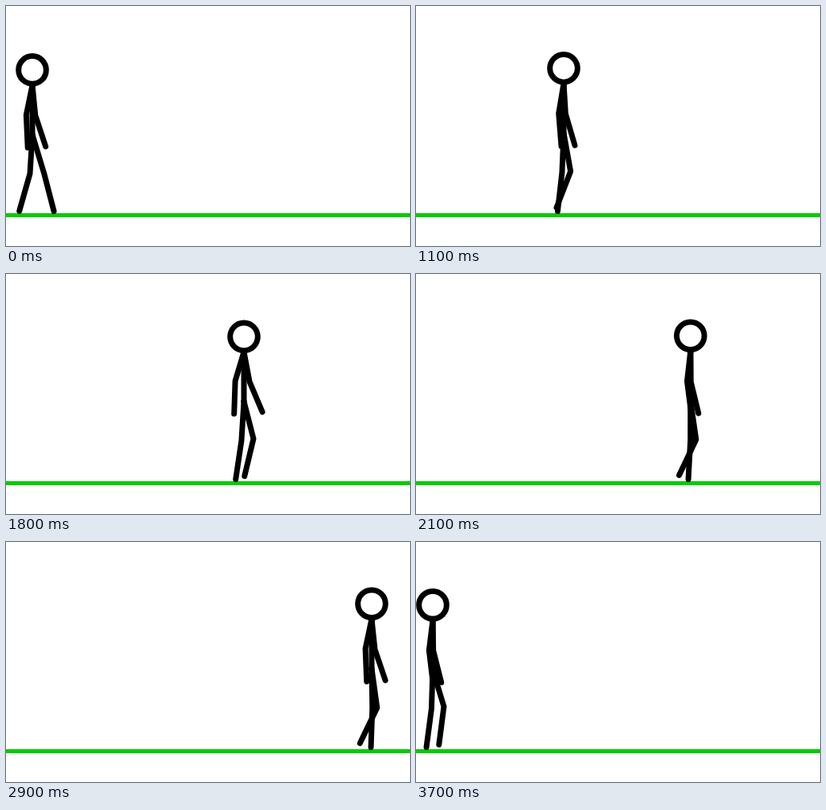
Write an HTML page with a canvas that moves like this. It is 506 px wide and 300 px high and loops after 3800 ms.

```html
<!DOCTYPE html>
<html lang="en">
<head>
<meta charset="utf-8">
<title>Walking figure</title>
<style>
  html, body { margin: 0; width: 100%; height: 100%; overflow: hidden; background: #fff; }
  canvas { display: block; }
</style>
</head>
<body>
<canvas id="stage" width="506" height="300"></canvas>
<script>
const ctx = document.getElementById('stage').getContext('2d');
const TICK = 100, TICKS = 38, LAP = 549;
const CONTACT = 28;      // heel lands this far ahead of the body
const GROUND = 256.5;
const UPPER_ARM = 38, FOREARM = 41;
const { PI, sin, cos } = Math;

// Body path as [tick, x], and where each step lands during one lap
const PATH = [[0, 33], [5, 93], [11, 185], [18, 298], [24, 388], [29, 458], [37, 570]];
const PRINTS = [60, 113, 177, 232, 287, 341, 401, 457, 513, 561];

// Endless access to a list that advances by one step per lap
const cycle = (list, n, add) => {
  const lap = Math.floor(n / list.length);
  return add(list[n - lap * list.length], lap);
};
const point = n => cycle(PATH, n, ([t, x], lap) => [t + lap * TICKS, x + lap * LAP]);
const print = n => cycle(PRINTS, n, (x, lap) => x + lap * LAP);

// Smooth curve through the unevenly spaced path points
function bodyX(t) {
  let i = 0;
  while (t >= point(i + 1)[0]) i++;
  const gap = k => point(k + 1)[0] - point(k)[0];
  const rate = k => (point(k + 1)[1] - point(k)[1]) / gap(k);
  const slope = k => (rate(k - 1) * gap(k) + rate(k) * gap(k - 1)) / (gap(k - 1) + gap(k));
  const [t0, x0] = point(i), x1 = point(i + 1)[1];
  const h = gap(i), s = (t - t0) / h, r = 1 - s;
  return x0 * (1 + 2 * s) * r * r + x1 * s * s * (3 - 2 * s)
    + h * s * r * (slope(i) * r - slope(i + 1) * s);
}

function pose(tick) {
  const x = bodyX(tick);
  let n = 0;
  while (x >= print(n + 1) - CONTACT) n++;
  const here = print(n), prev = print(n - 1), next = print(n + 1);
  const u = (x - here + CONTACT) / (next - here);
  const slip = 5 * u ** 6;
  const swing = .045 + .955 * u ** 1.6;
  const armLag = .63 + .22 * cos(2 * PI * (tick + 1.5) / TICKS);
  return {
    x,
    y: 78.6 + 1.3 * cos(2 * PI * u),
    legs: [
      { foot: [here + slip, GROUND], bend: 1 + 4 * u ** 4 },
      {
        foot: [prev + (next - prev) * swing, GROUND - 5 * sin(PI * u)],
        bend: 5 * (1 - u) + 12 * sin(PI * u ** 1.2)
      }
    ],
    arm: sin(PI * (n + u - armLag))
  };
}

function stroke(points) {
  ctx.beginPath();
  points.forEach(p => ctx.lineTo(p[0], p[1]));
  ctx.stroke();
}

function leg(hip, { foot, bend }) {
  const dx = foot[0] - hip[0], dy = foot[1] - hip[1];
  const k = bend / Math.hypot(dx, dy);
  stroke([hip, [hip[0] + dx / 2 + dy * k, hip[1] + dy / 2 - dx * k], foot]);
}

function reach([x, y], length, degrees) {
  const a = degrees * PI / 180;
  return [x + length * sin(a), y + length * cos(a)];
}

function arm(shoulder, swing) {
  const elbow = reach(shoulder, UPPER_ARM, -3 + 16.5 * swing);
  stroke([shoulder, elbow, reach(elbow, FOREARM, 10.5 + 15 * swing)]);
}

function drawFigure(p) {
  const neck = [p.x, p.y + 19], hip = [p.x, p.y + 81];
  stroke([neck, hip]);
  p.legs.forEach(l => leg(hip, l));
  arm(neck, p.arm);
  arm(neck, -p.arm);
  ctx.beginPath();
  ctx.arc(p.x, p.y, 17.3, 0, 2 * PI);
  ctx.stroke();
}

function draw(tick) {
  ctx.fillStyle = '#fff';
  ctx.fillRect(0, 0, 506, 300);
  ctx.fillStyle = '#0c0';
  ctx.fillRect(0, 259, 506, 5);
  ctx.strokeStyle = '#000';
  ctx.lineWidth = 7;
  ctx.lineCap = ctx.lineJoin = 'round';
  const p = pose(tick);
  drawFigure(p);
  // The next lap enters on the left as this one leaves on the right
  ctx.save();
  ctx.translate(-LAP, 0);
  drawFigure(p);
  ctx.restore();
}

const start = performance.now();
function loop() {
  draw(Math.floor((performance.now() - start) / TICK) % TICKS);
  requestAnimationFrame(loop);
}
loop();
</script>
</body>
</html>
```
